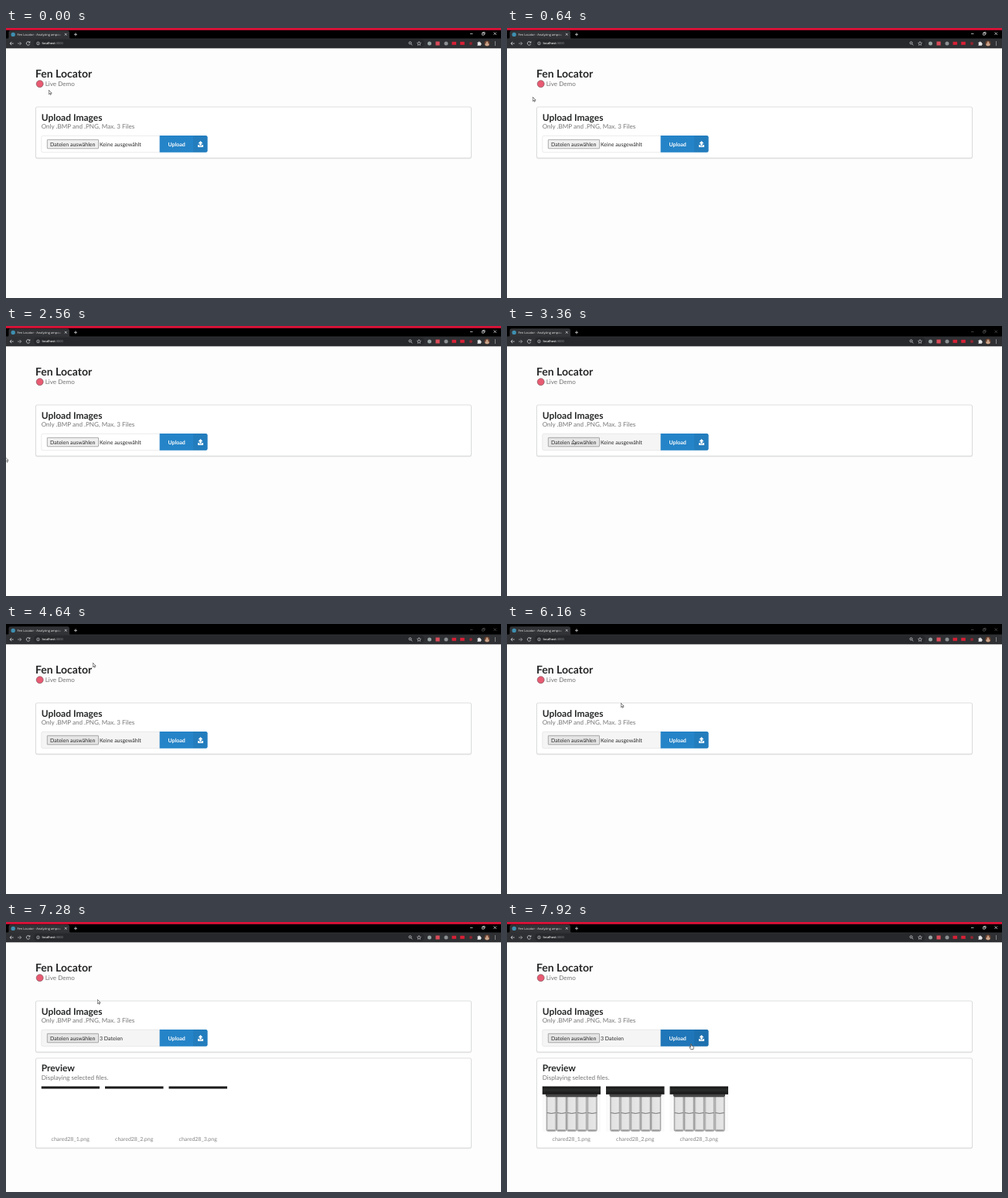
Animation of 640x349 px, one loop 8 s. Source, as an HTML page:

```html
<!DOCTYPE html>
<html lang="de">
<head>
<meta charset="utf-8">
<title>Fen Locator</title>
<style>
html, body { margin: 0; width: 100%; height: 100%; overflow: hidden; background: #fdfdfd; }
svg { display: block; width: 100%; height: 100%; }
text { font-family: Lato, sans-serif; text-rendering: geometricPrecision; white-space: pre; }
.h1 { font-size: 14px; font-weight: 700; fill: #262728; }
.h2 { font-size: 12px; font-weight: 700; fill: #262728; }
.sub { font-size: 8.1px; fill: #777; }
.txt { font-size: 7px; fill: #282828; }
.cap { font-size: 7px; fill: #858585; text-anchor: middle; }
.ui { font: 3.95px "Open Sans", sans-serif; fill: #f2f2f2; }
.line { fill: none; stroke: #d5d6d8; stroke-width: .8; }
.thin { stroke-width: .6; }
.card { fill: #fff; stroke: #d0d1d2; stroke-width: .7; }
.shade { fill: none; stroke: #22242618; stroke-width: 1.4; }

/* one percent of the loop is one 80 ms step */
.cue { opacity: 0; animation: 8s step-end infinite; }
.blur { animation-name: blur; }
.ctl { stroke: #e8e8e8; animation: dim 8s step-end infinite; }
.field { fill: #fff; animation: field 8s step-end infinite; }
.pick { fill: #efefef; animation: pick 8s step-end infinite; }
.none { opacity: 1; animation-name: none-out; }
.some { animation-name: some-in; }
.short { animation-name: short; }
.tall { animation-name: tall; }
.head { animation-name: head; }
.pics { animation: reveal 8s step-end infinite; }
.btn { fill: #2584c8; animation: hover 8s step-end infinite; }
.arrow { opacity: 1; animation-name: arrow; }
.hand { animation-name: hand; }
.mouse { animation: move 8s infinite; }

@keyframes blur { 0%, 84% { opacity: 0 } 40% { opacity: 1 } }
@keyframes dim { 0%, 84% { stroke: #e8e8e8 } 40% { stroke: #555 } }
@keyframes field { 0% { fill: #fff } 37% { fill: #f5f5f5 } }
@keyframes pick { 0% { fill: #efefef } 37% { fill: #e5e5e5 } }
@keyframes none-out { 0% { opacity: 1 } 85%, 100% { opacity: 0 } }
@keyframes some-in { 0% { opacity: 0 } 85%, 100% { opacity: 1 } }
@keyframes head { 0% { opacity: 0 } 86%, 100% { opacity: 1 } }
@keyframes short { 0%, 89% { opacity: 0 } 86% { opacity: 1 } }
@keyframes tall { 0% { opacity: 0 } 89%, 100% { opacity: 1 } }
@keyframes reveal {
  0% { clip-path: inset(100% 0 0 0) }
  90% { clip-path: inset(0 0 94.5% 0) }
  93%, 100% { clip-path: inset(0 0 0 0) }
}
@keyframes hover { 0% { fill: #2584c8 } 97%, 100% { fill: #1f76b8 } }
@keyframes arrow { 0% { opacity: 1 } 97%, 100% { opacity: 0 } }
@keyframes hand { 0% { opacity: 0 } 97%, 100% { opacity: 1 } }
@keyframes move {
  0%, 2% { transform: translate(55px, 80px); animation-timing-function: steps(6) }
  8% { transform: translate(33px, 89px); animation-timing-function: steps(3) }
  11%, 23% { transform: translate(18px, 94px); animation-timing-function: steps(3) }
  26%, 29% { transform: translate(85px, 148px); animation-timing-function: steps(1) }
  30% { transform: translate(78px, 163px); animation-timing-function: steps(1) }
  31% { transform: translate(36px, 167px); animation-timing-function: steps(1) }
  32%, 33% { transform: translate(-1px, 169.5px); animation-timing-function: steps(4) }
  37%, 45% { transform: translate(85px, 147px); animation-timing-function: steps(2) }
  47% { transform: translate(195px, 106px); animation-timing-function: steps(1) }
  48% { transform: translate(191px, 78px); animation-timing-function: steps(1) }
  49% { transform: translate(175px, 62px); animation-timing-function: steps(1) }
  50% { transform: translate(145px, 45px); animation-timing-function: steps(4) }
  54% { transform: translate(100px, 46px); animation-timing-function: steps(4) }
  58%, 60% { transform: translate(112px, 50px); animation-timing-function: steps(3) }
  63% { transform: translate(107px, 86px); animation-timing-function: steps(3) }
  66% { transform: translate(160px, 106px); animation-timing-function: steps(3) }
  69%, 72% { transform: translate(182px, 108px); animation-timing-function: steps(5) }
  77%, 79% { transform: translate(147px, 102px); animation-timing-function: steps(5) }
  84%, 92% { transform: translate(118px, 100px); animation-timing-function: steps(6) }
  98%, 100% { transform: translate(238px, 157px) }
}
</style>
</head>
<body>
<svg viewBox="0 0 640 349" preserveAspectRatio="none">
  <defs>
    <linearGradient id="bar" x2="0" y2="1">
      <stop offset="0" stop-color="#111"/><stop offset=".45" stop-color="#2b2d2c"/><stop offset="1" stop-color="#151515"/>
    </linearGradient>
    <linearGradient id="glass">
      <stop offset="0" stop-color="#b8b8b8"/><stop offset=".18" stop-color="#e2e2e2"/>
      <stop offset=".82" stop-color="#e6e6e6"/><stop offset="1" stop-color="#b8b8b8"/>
    </linearGradient>
    <linearGradient id="fade">
      <stop offset=".88" stop-color="#f2f2f2"/><stop offset="1" stop-color="#f2f2f2" stop-opacity=".3"/>
    </linearGradient>
    <g id="vial">
      <rect x=".4" y="12" width="12.2" height="46" rx="1.6" fill="url(#glass)" stroke="#858585" stroke-width=".7"/>
      <path d="M1 34.3Q6.5 36 12 34.3" fill="none" stroke="#666" stroke-width=".9"/>
      <path d="M1.8 56.8H11.2" stroke="#555" stroke-width=".8"/>
    </g>
    <g id="pic">
      <rect width="75.5" height="59" fill="#fafafa"/>
      <use href="#vial" x="5.3"/><use href="#vial" x="18.5"/><use href="#vial" x="31.7"/>
      <use href="#vial" x="44.9"/><use href="#vial" x="58.1"/>
      <path d="M4.5 10H71.5V12.5L70 14H6L4.5 12.5Z" fill="#484848"/>
      <rect width="75.5" height="10.5" fill="url(#bar)"/>
    </g>
  </defs>

  <rect width="640" height="349" fill="#fdfdfd"/>

  <!-- browser -->
  <rect width="640" height="14"/>
  <rect width="640" height="2.8" fill="#dc1238"/>
  <rect class="cue blur" width="640" height="3"/>
  <path d="M2 14Q3.5 14 3.5 12V5.5Q3.5 3.2 6 3.2H79.5Q82 3.2 82 5.5V12Q82 14 83.5 14Z" fill="#323336"/>
  <circle cx="9.2" cy="8.4" r="2.7" fill="#3e8fb0"/>
  <text class="ui" x="14.5" y="9.8" style="fill:url(#fade)">Fen Locator - Analyzing ampou</text>
  <path class="line" d="M75.9 6.9l2.8 2.8m0-2.8l-2.8 2.8M88 8.3h4m-2-2v4"/>
  <g class="ctl" fill="none" stroke-width=".7">
    <path d="M600 7.5h3.5M630.5 5.5l3.5 3.5m0-3.5l-3.5 3.5"/>
    <path d="M615.5 6.5h2.6v2.6h-2.6zM616.5 6.3v-.9h2.6v2.6h-.9"/>
  </g>
  <rect y="13.5" width="640" height="12.8" fill="#2f3033"/>
  <rect x="36" y="14.8" width="505" height="10.2" rx="5.1" fill="#27282b"/>
  <path class="line" d="M9.7 20H5m2.2-2.2L5 20l2.2 2.2"/>
  <path class="line" d="M15 20h4.7m-2.2-2.2l2.2 2.2-2.2 2.2" style="stroke:#a5a6a8"/>
  <path class="line" d="M30.6 18.7a2.3 2.3 0 1 0 .2 2M30.9 17.3v1.7h-1.7"/>
  <circle class="line thin" cx="41.5" cy="19.9" r="1.9"/>
  <path class="line thin" d="M41.5 19.5v1.5m0-2.3v.4"/>
  <text class="ui" x="46.5" y="21.3"><tspan font-weight="600">localhost</tspan><tspan fill="#999da1">:3000</tspan></text>
  <circle class="line" cx="522.5" cy="19.3" r="1.5"/>
  <path class="line" d="M523.6 20.5l1.7 1.7"/>
  <path class="line thin" d="M534 17.5l.7 1.6 1.8.2-1.3 1.2.4 1.8-1.6-.9-1.6.9.4-1.8-1.3-1.2 1.8-.2z"/>
  <circle cx="547.5" cy="20" r="2.5" fill="#98a5a3"/>
  <rect x="555.5" y="17.5" width="5.2" height="5" fill="#d94b59"/>
  <circle cx="569" cy="20" r="2.5" fill="#8c8f92"/>
  <rect x="576.5" y="17.8" width="5.6" height="4" fill="#d81f35"/>
  <rect x="587.2" y="17.8" width="5.6" height="4" fill="#d81f35"/>
  <circle cx="601" cy="20" r="2" fill="#8d2430"/>
  <path d="M609.5 18.5h1.3a.9 .9 0 0 1 1.8 0h1.3v1.3a.9 .9 0 0 1 0 1.8v1.1h-4.4v-1.2a.9 .9 0 0 0 0-1.6z" fill="#e4e5e6"/>
  <circle cx="622" cy="20" r="3.4" fill="#70432f"/>
  <path d="M619.3 22a2.7 2.7 0 0 1 5.4 0 3.4 3.4 0 0 1-5.4 0z" fill="#c9a48b"/>
  <circle cx="622" cy="18.7" r="1.3" fill="#c9a48b"/>
  <path d="M632.5 17.5v1m0 1v1m0 1v1" stroke="#d5d6d8"/>

  <!-- page -->
  <text class="h1" x="38" y="63.5">Fen Locator</text>
  <circle cx="43.7" cy="72.2" r="4.5" fill="#e85b72" stroke="#70525a" stroke-width=".6"/>
  <text class="sub" x="50.7" y="75">Live Demo</text>

  <rect class="shade" x="38.5" y="102.6" width="563" height="66" rx="2"/>
  <rect class="card" x="38.5" y="102" width="563" height="66" rx="2"/>
  <text class="h2" x="45.7" y="119.5">Upload Images</text>
  <text class="sub" x="45.7" y="130">Only .BMP and .PNG, Max. 3 Files</text>
  <rect class="field" x="45.8" y="139.3" width="154" height="21.4" rx="2" stroke="#dedede" stroke-width=".6"/>
  <rect class="pick" x="53.3" y="144.3" width="66.2" height="11.5" rx=".6" stroke="#767676" stroke-width=".6"/>
  <text class="txt" x="57" y="152.6">Dateien auswählen</text>
  <text class="txt cue none" x="121" y="152.6">Keine ausgewählt</text>
  <text class="txt cue some" x="121" y="152.6">3 Dateien</text>
  <path class="btn" d="M198.6 139h59.7q2.3 0 2.3 2.3v17.2q0 2.3-2.3 2.3H198.6z"/>
  <path d="M242 139h16.3q2.3 0 2.3 2.3v17.2q0 2.3-2.3 2.3H242z" fill="#0000000d"/>
  <text class="txt" x="209.5" y="152.6" style="fill:#fff;font-weight:700">Upload</text>
  <path d="M251.5 146l3.1 3.2h-2v2.7h-2.2v-2.7h-2zM248 151h1.7v1.6h3.6V151h1.7v2.9h-7z" fill="#fff"/>

  <!-- preview -->
  <g class="cue short">
    <rect class="shade" x="38.5" y="176.6" width="563" height="53" rx="2"/>
    <rect class="card" x="38.5" y="176" width="563" height="53" rx="2"/>
  </g>
  <g class="cue tall">
    <rect class="shade" x="38.5" y="176.6" width="563" height="116" rx="2"/>
    <rect class="card" x="38.5" y="176" width="563" height="116" rx="2"/>
    <g class="pics">
      <use href="#pic" x="45.5" y="212.3"/>
      <use href="#pic" x="128" y="212.3"/>
      <use href="#pic" x="210.5" y="212.3"/>
    </g>
    <text class="cap" x="83.2" y="282.8">chared28_1.png</text>
    <text class="cap" x="165.7" y="282.8">chared28_2.png</text>
    <text class="cap" x="248.2" y="282.8">chared28_3.png</text>
  </g>
  <g class="cue head">
    <text class="h2" x="45.7" y="193.3">Preview</text>
    <text class="sub" x="45.7" y="204">Displaying selected files.</text>
  </g>

  <g class="mouse" fill="#fff" stroke="#222" stroke-width=".6" stroke-linejoin="round">
    <path class="cue arrow" d="M.3 .3V5.7L1.6 4.5 2.5 6.4 3.3 6 2.5 4.2H4.2Z"/>
    <path class="cue hand" d="M-.6 .8Q0-.3 .6 .8V3L3 3.6Q3.6 3.8 3.5 4.6L3 7.5H-.5L-2.3 4.8Q-2 4-1.2 4.5L-.6 5Z"/>
  </g>
</svg>
</body>
</html>
```
